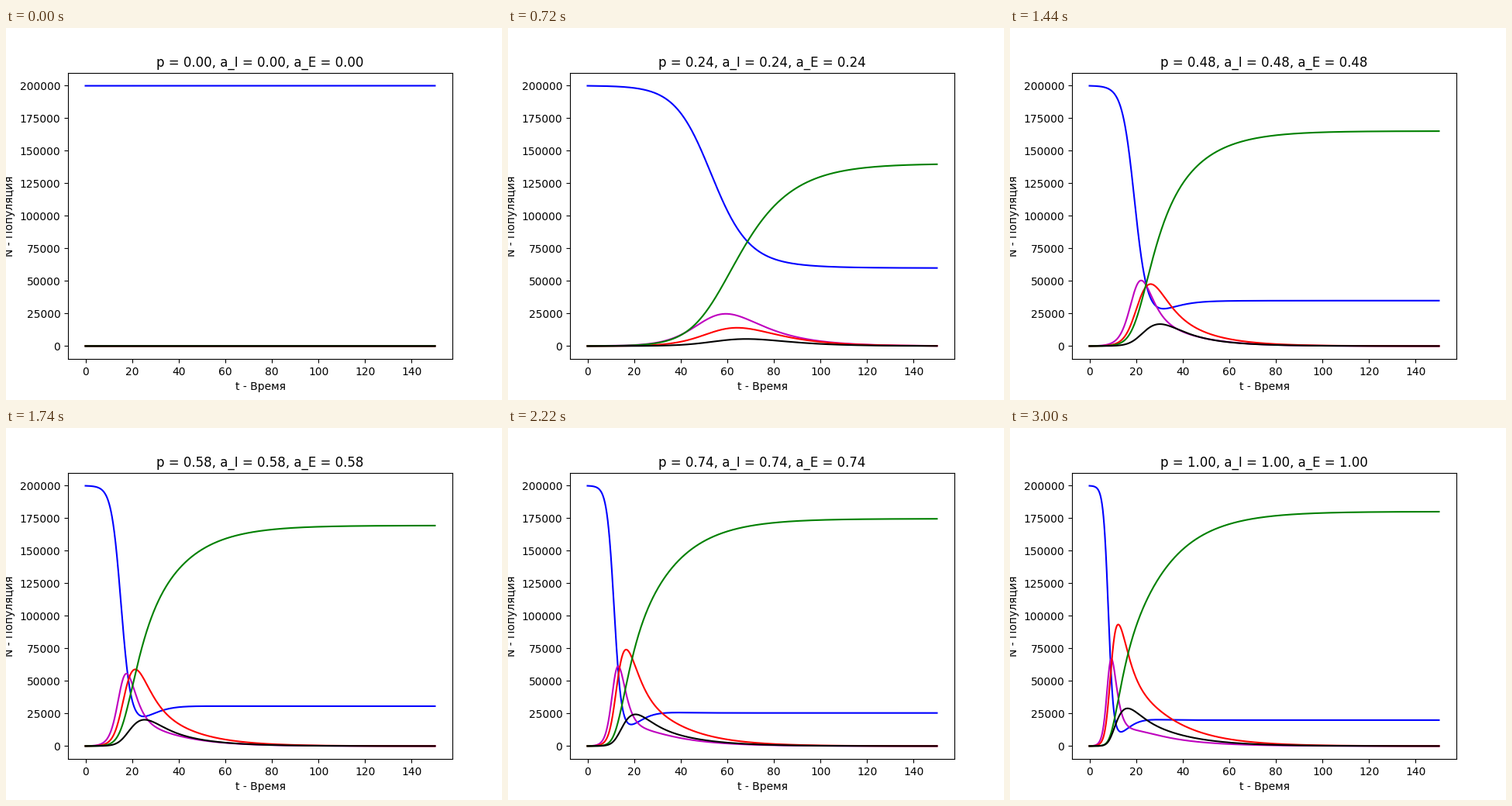
A matplotlib script for the animation above (3330 ms loop, 640 by 480 pixels).

```python
import numpy as np
import matplotlib.pyplot as plt
from matplotlib.animation import FuncAnimation

N = 200000
DAYS, DT = 150, 0.1
STEPS = 50            # parameter goes from 0 to 1 in this many steps
INTERVAL = 30
HOLD = 11             # ticks spent on the last step

# transition rates per day
E_TO_I, E_TO_R = 0.5, 0.1
I_TO_R, I_TO_C = 0.1, 0.1
C_TO_S = 0.25


def rates(state, p):
    s, e, i, r, c = state
    infected = p * (i + e) * s / N
    sick = p * E_TO_I * e
    healed = (1 - p) * E_TO_R * e
    return np.array([
        -infected + C_TO_S * c,
        infected - sick - healed,
        sick - (I_TO_R + I_TO_C) * i,
        healed + I_TO_R * i,
        I_TO_C * i - C_TO_S * c,
    ])


def solve(p):
    """Runge-Kutta for all values of p at once: (time, compartment, p)."""
    state = np.zeros((5, p.size))
    state[0], state[2] = N - 100, 100
    out = [state]
    for _ in range(round(DAYS / DT)):
        k1 = rates(state, p)
        k2 = rates(state + DT / 2 * k1, p)
        k3 = rates(state + DT / 2 * k2, p)
        k4 = rates(state + DT * k3, p)
        state = state + DT / 6 * (k1 + 2 * k2 + 2 * k3 + k4)
        out.append(state)
    return np.array(out)


params = np.linspace(0, 1, STEPS + 1)
curves = solve(params)
t = np.linspace(0, DAYS, len(curves))

fig, ax = plt.subplots(figsize=(6.4, 4.8), dpi=100)
ax.set_xlim(-0.05 * DAYS, 1.05 * DAYS)
ax.set_ylim(-0.05 * N, 1.05 * N)
ax.set_xlabel("t - Время")
ax.set_ylabel("N - Популяция")
title = ax.set_title("")
lines = [ax.plot([], [], color)[0] for color in "bmrgk"]


def update(tick):
    k = min(tick // 2, STEPS)
    p = params[k]
    for j, line in enumerate(lines):
        line.set_data(t, curves[:, j, k])
    title.set_text(f"p = {p:.2f}, a_I = {p:.2f}, a_E = {p:.2f}")
    return [*lines, title]


anim = FuncAnimation(fig, update, frames=2 * STEPS + HOLD,
                     interval=INTERVAL, repeat=True, repeat_delay=0)
plt.show()
```
